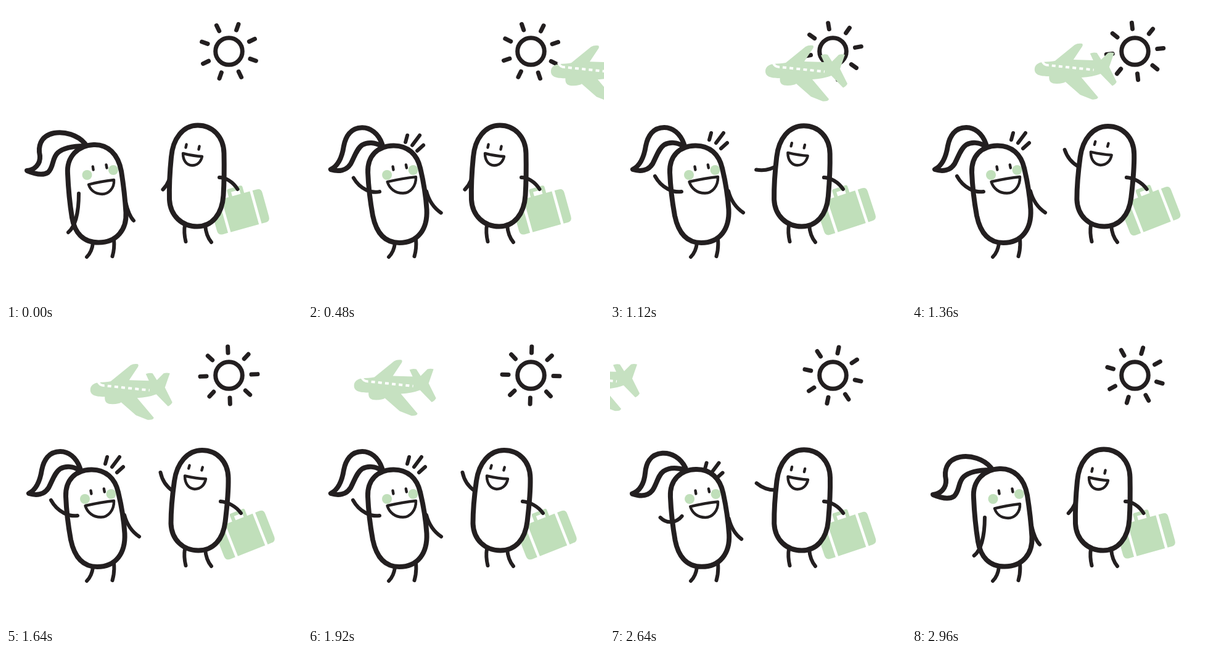
Recreate the animation shown at these times as an HTML page. Size 480 by 480 pixels, loop 3 s.

```html
<!DOCTYPE html>
<html lang="en">
<head>
<meta charset="utf-8">
<title>Holiday greeting</title>
<style>
  html, body { margin: 0; width: 100%; height: 100%; overflow: hidden; background: #fff; }
  svg { display: block; width: 100vw; height: 100vh; }
  .ink { fill: none; stroke: #231f20; stroke-width: 6; stroke-linecap: round; stroke-linejoin: round; }
  .bold { stroke-width: 8; }
  .fine { stroke-width: 4.4; }
  .paper { fill: #fff; }
  .green { fill: #c0dfba; }
  .gap { fill: none; stroke: #fff; stroke-width: 4; }
</style>
</head>
<body>
<svg viewBox="0 0 480 480">
  <circle class="ink" cx="361.5" cy="73.5" r="21.8" style="stroke-width:7"/>
  <g id="rays" class="ink" style="stroke-width:7"></g>

  <g id="plane">
    <path fill="#c6e1c1" d="M252 107 C252 100 257 96 265 95 C272 94.500 279 94 285 93 L317 67 Q322 64 329 65
      Q331 67 329 70 L315 91 L347 92 L342 81 Q347 78.500 353 80 L360 91 L371 80 Q376 78.500 381 80
      L373 103 L385 127 Q383 131 378 133.500 L359 114 Q346 119 328 120 L355 152 Q354 156 345 155.500
      L326 148 L302 127 Q299 129.500 288 130 C279 130 275 127 275.500 118 C265 118 252 117 252 107Z"/>
    <path class="gap" d="M264 92 C266 98 269 100 275 100"/>
    <path class="gap" d="M280 100.500 L348 107.500" stroke-dasharray="6 5.200"/>
  </g>

  <g id="sparks" class="ink">
    <path d="M164 206 L161 217 M184 206 L172 222 M190 222 L180 231"/>
  </g>

  <!-- girl -->
  <path class="ink" d="M141 384 C140 394 137 401 131 407 M175 378 C176 390 175 398 172.500 406"/>
  <path id="gHand" class="ink"/>
  <path id="hair" class="ink paper bold"/>
  <path id="gFill" class="paper"/>
  <g id="cheeks" class="green">
    <circle cx="131.500" cy="274" r="8"/><circle cx="174" cy="266" r="8"/>
  </g>
  <path id="gBody" class="ink bold"/>
  <path id="gEyes" class="ink fine"/>
  <path id="gMouth" class="ink fine paper"/>
  <path id="gWave" class="ink"/>

  <!-- traveller -->
  <g id="bag">
    <g class="green">
      <path d="M-29.500 -27.500 H-38 Q-46 -27.500 -46 -20 V20 Q-46 28 -38 28 H-29.500Z"/>
      <path d="M-25 -27.500 H22.500 V28 H-25Z"/>
      <path d="M27 -27.500 H34 Q41.500 -27.500 41.500 -20 V20 Q41.500 28 34 28 H27Z"/>
    </g>
    <path d="M-10 -27 V-37.500 H10 V-27" fill="none" stroke="#c0dfba" stroke-width="6" stroke-linejoin="round"/>
  </g>
  <path class="ink" d="M290 355 C288 368 290 376 291.500 382 M323 355 C324 370 328 377 333 383"/>
  <path id="mWave" class="ink" d="M3 0 C-9 8 -21 9 -32 7"/>
  <path id="mBody" class="ink bold paper"/>
  <path id="mEyes" class="ink fine"/>
  <path id="mMouth" class="ink fine paper"/>
  <path id="mHold" class="ink"/>
</svg>
<script>
const LOOP = 3000, STEP = 40;
const el = id => document.getElementById(id);

// Each part: [resting outline, waving outline]
const girl = {
  hair: [
    'M128 223 C116 209 95 203 78 206 C54 211 52 230 55 243 C56 257 46 266 34 267 C48 273 60 275 68 270 C78 261 74 247 84 238 C93 230 108 227 128 227',
    'M120 224 C114 206 101 197 88 197 C69 197 61 212 58 227 C55 246 49 259 37 265 C50 269 62 267 69 256 C75 245 79 231 88 225 C97 220 109 221 118 227'],
  gBody: [
    'M142 225 C165 224 182 240 187 268 C190 287 193 310 194.5 335 C196 362 180 383.5 150 383.5 C124 383.5 111 366 107 343 C103 318 101 295 100 272 C98 244 117 226 142 225Z',
    'M138 226.5 C162 226 177 241 182 263 C187 284 191 306 192.5 330 C194 362 178 384 148 384 C122 384 110 364 105 340 C101 318 98 295 97 270 C96 243 113 227 138 226.5Z'],
  gEyes: [
    'M140.8 260.5 L141.6 265.5 M162.5 257.5 L163.5 262.5',
    'M137.5 260.5 L138.4 265.5 M158.8 257.5 L159.8 262.5'],
  gMouth: [
    'M134 289.5 C147 286 162 283.5 175 282 C176 296 166 305 156 305 C145 305 137 299 134 289.5Z',
    'M128.5 285 C144 281.5 160 278.5 175 277 C175.5 292 166 303.5 154 303.5 C141 303.5 132 296 128.5 285Z'],
  gWave: [
    'M118 304 C118 335 112 358 101 367',
    'M116 301 C103 303 84 296 73 276'],
  gHand: [
    'M194 318 C198 335 202 343 207 348',
    'M192 300 C196 315 204 327 216 335']
};
const man = {
  mBody: [
    'M311 193.5 C335 193.5 353 212 353.5 239 C354 262 354 282 352.5 307 C350.5 338 334 357.5 310 357.5 C285 357.5 266.5 340 265 314 C264.5 295 265.5 270 268 245 C270.5 215 287 193.5 311 193.5Z',
    'M318 195 C342 195 360 213 360.5 240 C361 262 358.5 286 355.5 311 C352 340 336 357.5 312 357.5 C287 357.5 268.5 340 267.5 314 C267.5 294 269.5 270 273 245 C277 216 294 195 318 195Z'],
  mEyes: [
    'M291.5 229.5 L292.6 224.5 M312.5 232.5 L313.6 227.5',
    'M296.2 224.5 L297.6 219.5 M317.4 227.5 L318.8 222.5'],
  mMouth: [
    'M287 239 C297 241.5 308 243.5 318 244 C316 253 310 258.5 302 258.5 C293 258 287 251 287 239Z',
    'M290 236.5 C301 239 313 241 324 241.5 C322 252 315 258 306 258 C297 257.5 290 250 290 236.5Z'],
  mHold: [
    'M346 278 C356 278 368 285 375.5 297',
    'M348 278 C360 279 373 286 381 297']
};

const lerp = (a, b, k) => a + (b - a) * k;
const ease = p => (1 - Math.cos(Math.PI * Math.min(1, Math.max(0, p)))) / 2;
const span = (t, from, to) => ease((t - from) / (to - from));

function mix([a, b], k) {
  const to = b.match(/[\d.]+/g);
  let i = 0;
  return a.replace(/[\d.]+/g, n => lerp(+n, +to[i++], k).toFixed(2));
}
function pose(parts, k) {
  for (const id in parts) el(id).setAttribute('d', mix(parts[id], k));
}
function place(id, x, y, turn = 0) {
  el(id).setAttribute('transform', `translate(${x} ${y}) rotate(${turn})`);
}

for (let i = 0; i < 8; i++) {
  const ray = document.createElementNS('http://www.w3.org/2000/svg', 'path');
  ray.setAttribute('d', 'M0 -36.5 V-46.5');
  ray.setAttribute('transform', `rotate(${i * 45})`);
  el('rays').append(ray);
}

function draw(t) {
  place('rays', 361.5, 73.5, -25.6 + 0.0142 * t);
  place('plane', 0.2217 * (1120 - t), -0.7 - 23.5 * span(t, 1000, 2500));

  // arms settle slightly later than the traveller's body
  const back = span(t, 2424, 3000);
  const g = span(t, 0, 540) - back;
  pose(girl, g);
  el('gFill').setAttribute('d', mix(girl.gBody, g));
  place('cheeks', -3.5 * g, 0);
  const hide = 1 - span(t, 0, 620) + back;
  place('sparks', -24 * hide, 31 * hide);

  const rise = span(t, 830, 1450);
  const lean = rise - span(t, 2330, 2950);
  pose(man, lean);
  place('bag', lerp(381, 389, lean), lerp(333, 331.5, lean), lerp(-15.5, -21.5, lean));
  const wave = rise - back;
  const lift = Math.min(1, wave / 0.45);
  place('mWave', lerp(266, 269, lift), lerp(267, 258, lift), lerp(-57, 68, wave));
}

const start = performance.now();
function tick() {
  const t = (performance.now() - start) % LOOP;
  draw(Math.floor(t / STEP) * STEP);
  requestAnimationFrame(tick);
}
tick();
</script>
</body>
</html>
```
